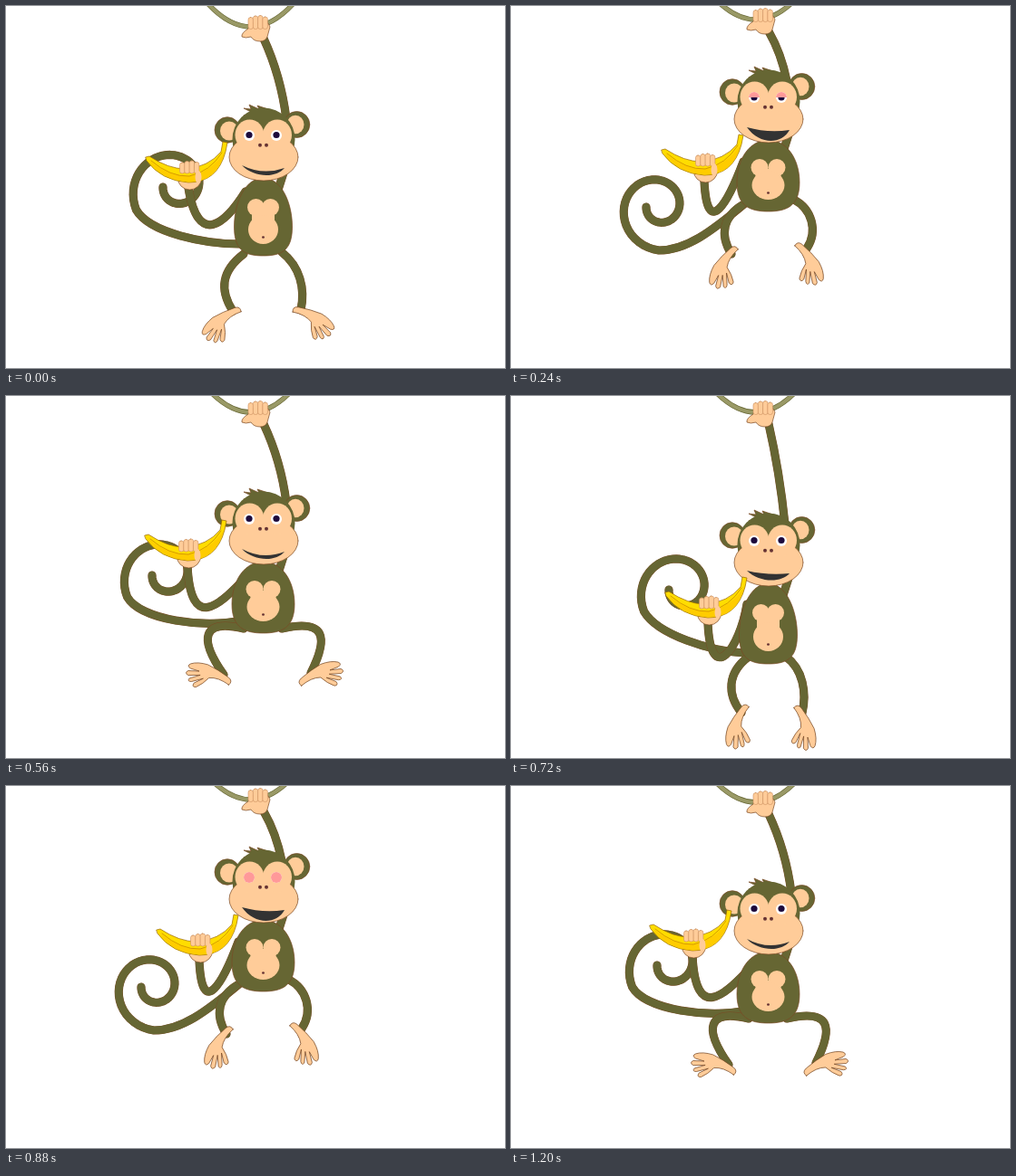
Recreate the animation shown at these times as an HTML page with a canvas. Size 550x400 px, loop 1280 ms.

```html
<!DOCTYPE html>
<html lang="en">
<head>
<meta charset="utf-8">
<title>Swinging monkey</title>
<style>
  html, body { margin: 0; width: 100%; height: 100%; overflow: hidden; background: #fff; }
  canvas { display: block; width: 550px; height: 400px; }
</style>
</head>
<body>
<canvas id="stage" width="550" height="400"></canvas>
<script>
const g = document.getElementById('stage').getContext('2d');
const FUR = '#666633', SKIN = '#ffcc99', EDGE = '#7a4a24', PINK = '#ff9999';
const STEP = 80, STEPS = 16, CYCLE = 8;

// head, grip: vertical shifts; mouth: lip heights; body: half width, bottom; belly: half width, top, bottom
// arm: shoulder and controls; fruit: banana tip; tail: spiral centre, radius, start angle, base y, control y
// legs: cubic; feet: heel and angle
const rest = {
  head: 0, grip: 5, reach: 309, mouth: [182.5, 187], body: [32, 276], belly: [17.5, 213, 263],
  arm: [264, 205, 242, 240, 212, 268], fruit: [155, 169], tail: [187, 200, 59, 150, 263, 263],
  legL: [262, 274, 236, 294, 236, 315, 250, 337], footL: [257, 337, 136],
  legR: [304, 272, 324, 288, 330, 312, 325, 336], footR: [318, 337, 36]
};
const low = {
  head: 17, grip: 0, reach: 302, mouth: [179.5, 186.5], body: [32, 296], belly: [17.5, 230, 282],
  arm: [260, 230, 252, 280, 220, 322], fruit: [171, 219], tail: [188, 214, 56, 150, 284, 282],
  legL: [262, 288, 238, 306, 238, 330, 254, 350], footL: [260, 344, 104],
  legR: [303, 288, 322, 302, 326, 328, 321, 350], footR: [314, 345, 78]
};
const high = {
  head: -42, grip: -3, reach: 304, mouth: [180, 191], body: [34.5, 227], belly: [19, 169, 214],
  arm: [256, 172, 240, 215, 216, 260], fruit: [167, 161], tail: [163, 222, 48, 90, 218, 250],
  legL: [255, 220, 235, 232, 229, 252, 243, 274], footL: [248, 269, 114],
  legR: [312, 214, 331, 224, 339, 248, 326, 268], footR: [315, 265, 66]
};
const kick = {
  head: -39, grip: -3, reach: 305, mouth: [178.5, 190], body: [37, 228], belly: [20, 171, 216],
  arm: [252, 172, 240, 215, 208, 248], fruit: [164, 128], tail: [163, 197, 48, 90, 222, 238],
  legL: [258, 222, 212, 214, 210, 232, 232, 264], footL: [238, 264, 145],
  legR: [312, 214, 352, 206, 354, 222, 344, 259], footR: [332, 259, 25]
};
const squat = {
  head: -7, grip: 0, reach: 309, mouth: [183, 187], body: [34.5, 262], belly: [19, 204, 249],
  arm: [262, 203, 240, 225, 204, 266], fruit: [154, 156], tail: [175, 198, 56, 150, 248, 257],
  legL: [262, 257, 216, 246, 212, 268, 240, 308], footL: [245, 317, 192],
  legR: [304, 257, 352, 246, 356, 266, 336, 306], footR: [326, 318, -16]
};

// Smooth midpoint of b and c, with a and d as outer neighbours
function between(a, b, c, d) {
  if (typeof b === 'number') return (9 * (b + c) - a - d) / 16;
  const out = Array.isArray(b) ? [] : {};
  for (const k in b) out[k] = between(a[k], b[k], c[k], d[k]);
  return out;
}
const spread = between(high, kick, squat, low);
for (const [side, dx] of [['L', -11], ['R', 11]]) {
  for (const i of [2, 4, 6]) spread['leg' + side][i] += dx;
  spread['foot' + side][0] += dx;
}
const poses = [rest, low, between(squat, low, high, kick), high,
               between(low, high, kick, squat), kick, spread, squat];
const lids = { 3: 0.5, 4: 1, 10: 0.5, 11: 1, 12: 0.5 };

function shape(path, fill, line = EDGE, width = 0.7) {
  const p = typeof path === 'string' ? new Path2D(path) : path;
  g.fillStyle = fill;
  g.fill(p);
  if (line) {
    g.strokeStyle = line;
    g.lineWidth = width;
    g.stroke(p);
  }
}
function oval(x, y, rx, ry, fill, line = null) {
  const p = new Path2D();
  p.ellipse(x, y, rx, ry, 0, 0, 2 * Math.PI);
  shape(p, fill, line);
}
function limb(path) {
  const p = new Path2D(path);
  g.lineCap = g.lineJoin = 'round';
  for (const [color, width] of [[EDGE, 9.2], [FUR, 8.5]]) {
    g.strokeStyle = color;
    g.lineWidth = width;
    g.stroke(p);
  }
}
function at(x, y, draw) {
  g.save();
  g.translate(x, y);
  draw();
  g.restore();
}
const cubic = ([x, y, ...rest]) => `M${x} ${y}C${rest.join(' ')}`;

function fingers(x, y, h) {
  [2, 0.5, 0, 1.5].forEach((drop, i) => {
    const p = new Path2D();
    p.roundRect(x + i * 5.3, y + drop, 5.5, h - drop, 2.5);
    shape(p, SKIN, '#c98f5f', 0.6);
  });
}

function drawTail([cx, cy, R, start, baseY, bendY]) {
  const a0 = start * Math.PI / 180, end = 3 * Math.PI;
  const pts = [];
  for (let i = 0; i <= 60; i++) {
    const a = a0 + (end - a0) * i / 60;
    const u = Math.max(0, (a - Math.PI / 2) / (2.5 * Math.PI));
    const r = 14 + (R - 14) * Math.max(0, 1 - u) ** 1.5;
    pts.push([cx + r * Math.cos(a), cy + r * Math.sin(a)]);
  }
  const [x, y] = pts[0];
  limb(`M258 ${baseY}C220 ${bendY} ${x + 30 * Math.sin(a0)} ${y - 30 * Math.cos(a0)} ${x} ${y}L${pts.join(' ')}`);
}

function drawFoot([x, y, angle], side) {
  at(x, y, () => {
    g.rotate(angle * Math.PI / 180);
    g.scale(1, side);
    shape('M-1 2Q-5-3 1-6Q14-12 26-15Q38-16 45-12Q49-9 44-7L34-6L46-4Q50-1 45 1L32-2L43 4Q45 8 40 7L28 1L37 8Q39 13 34 12Q27 7 22-1Q12-4-1 2Z', SKIN);
  });
}

function drawVine(grip) {
  const p = new Path2D('M216-10Q270 56 323-10');
  at(0, grip - 5, () => {
    for (const [color, width] of [['#666633', 5.4], ['#999966', 4.2]]) {
      g.strokeStyle = color;
      g.lineWidth = width;
      g.stroke(p);
    }
  });
}

function drawTopHand(grip) {
  at(0, grip, () => {
    shape('M267 20Q259 25 260 29Q264 31 270 29Q273 34 280 34Q286 34 288 29L291 18L289 14L268 14Z', SKIN);
    fingers(267, 5.5, 15);
  });
}

function drawBody([w, bottom], head) {
  const top = 190 + head, l = 283.5 - w, r = 283.5 + w;
  shape(`M283.5 ${top}C304 ${top} ${r} ${bottom - 58} ${r} ${bottom - 32}
    C${r} ${bottom - 6} 304 ${bottom} 283.5 ${bottom}
    C263 ${bottom} ${l} ${bottom - 6} ${l} ${bottom - 32}C${l} ${bottom - 58} 263 ${top} 283.5 ${top}Z`, FUR);
}

function drawBelly([w, top, bottom]) {
  for (const s of [-1, 1]) oval(283.5 + s * (w - 9.5), top + 9.5, 9.5, 9.5, SKIN);
  const waist = top + 11;
  g.fillStyle = SKIN;
  g.fillRect(283.5 - w + 5, waist, 2 * w - 10, bottom - 16 - waist);
  oval(283.5, bottom - 16, w - 1, 16, SKIN);
  oval(283.5, bottom - 7.5, 1.5, 1.2, '#663333');
}

function drawHead([upper, lower], lid) {
  oval(244, 137, 14, 14.3, FUR, EDGE);
  oval(246, 138, 10, 10.5, SKIN);
  oval(320.5, 131, 14.3, 14.5, FUR, EDGE);
  oval(319, 131, 9.5, 10.3, SKIN);
  shape('M262 121L270 117L262 113L270 114L268 109L279 114L277 110L298 117Z', FUR);
  oval(284, 147.5, 34.5, 35, FUR);
  oval(284, 167, 38, 26, SKIN, EDGE);
  oval(268.5, 142.5, 16, 17, SKIN);
  oval(299, 142.5, 16, 17, SKIN);
  g.fillStyle = SKIN;
  g.fillRect(258, 144, 52, 14);
  for (const x of [268, 298]) {
    oval(x, 143, 6, 6, '#fff');
    oval(x, 142.5 + lid, 3.6, 3.6, '#1d0a3c');
    if (lid) {
      g.save();
      g.beginPath();
      g.rect(x - 8, 136, 16, 14 * lid);
      g.clip();
      oval(x, 143, 6, 6, PINK);
      g.restore();
    }
  }
  for (const x of [280, 287]) oval(x, 153.7, 2, 2, '#663333');
  const dip = (4 * lower - 177.5) / 3;
  shape(`M260 176Q283 ${2 * upper - 177.5} 307 179C298 ${dip} 274 ${dip} 260 176Z`, '#333333', null);
}

function drawBanana() {
  shape('M-1-2L3-3Q24 11 43 11Q68 9 82-8L84-19L89-18L87-8Q78 26 46 26Q16 24 0 2Z', '#ffdd00', '#996600');
  shape('M2 1Q24 20 47 19Q72 14 86-8Q78 26 46 25.5Q16 23 2 1Z', '#ffcc00', null);
  g.strokeStyle = '#cc8800';
  g.lineWidth = 0.8;
  g.stroke(new Path2D('M5 2Q26 20 47 19Q70 14 83-7'));
  fingers(36.5, 2, 14);
  oval(57, 20, 3.5, 7, SKIN);
}

function draw(step) {
  const p = poses[step % CYCLE];
  const [fx, fy] = p.fruit;
  g.clearRect(0, 0, 550, 400);
  drawVine(p.grip);

  const topY = 31 + p.grip, neckY = 125 + p.head;
  limb(`M284 ${topY}Q${p.reach - 6} ${(topY + neckY) / 2 - 3} ${p.reach} ${neckY}L306 ${p.head + 184}L299 ${p.head + 206}`);
  drawTopHand(p.grip);

  drawTail(p.tail);
  limb(cubic([...p.arm, fx + 46, fy + 32]));
  limb(cubic(p.legL));
  limb(cubic(p.legR));
  drawFoot(p.footL, -1);
  drawFoot(p.footR, 1);
  drawBody(p.body, p.head);
  drawBelly(p.belly);

  at(fx, fy, () => oval(47.5, 21.5, 13, 12.5, SKIN, EDGE));
  at(0, p.head, () => drawHead(p.mouth, lids[step] || 0));
  at(fx, fy, drawBanana);
}

function tick() {
  draw(Math.floor(performance.now() / STEP) % STEPS);
  requestAnimationFrame(tick);
}
tick();
</script>
</body>
</html>
```
